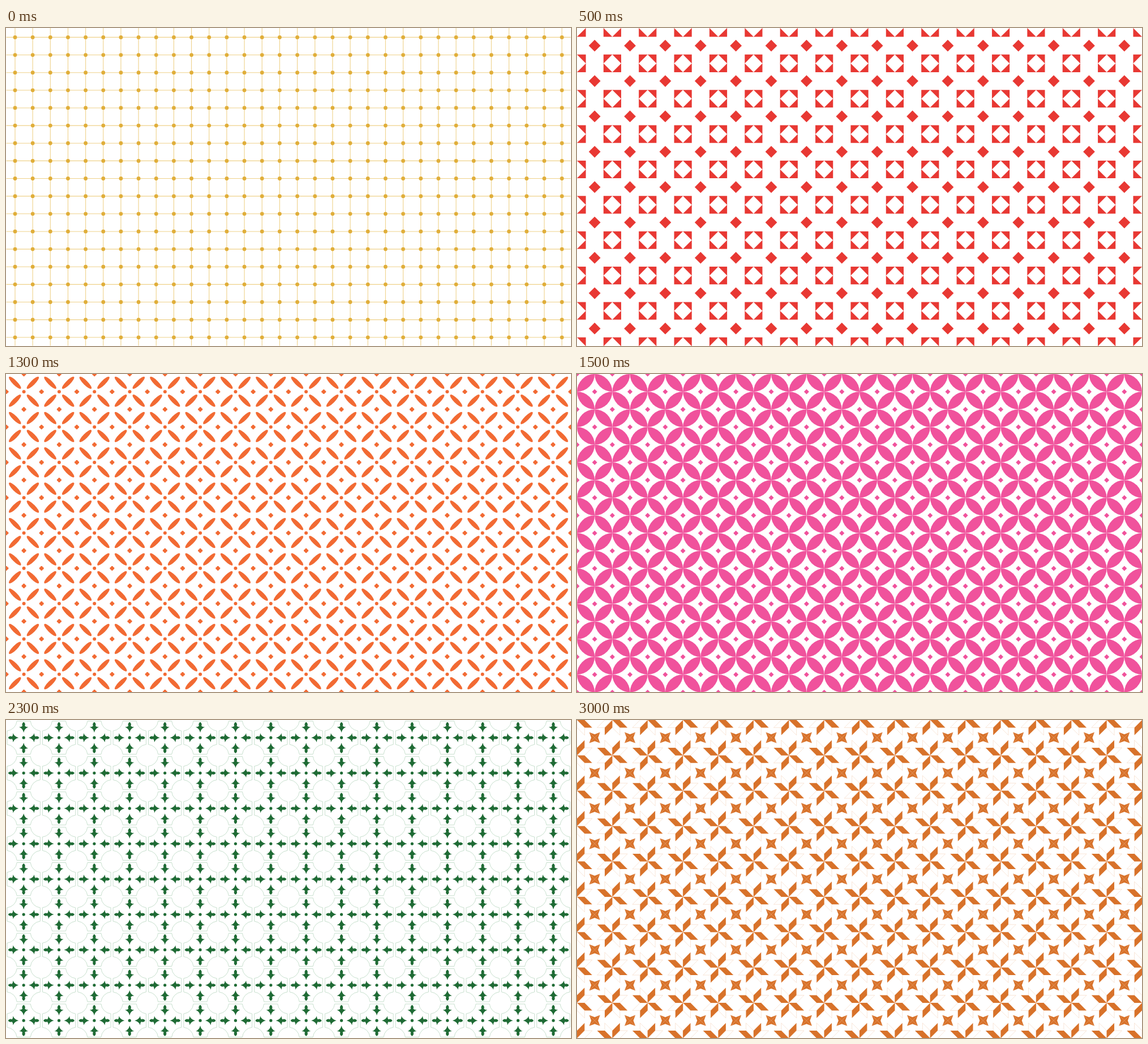
These frames come from a looping animation (998x561 px, 3.5 s). An HTML page with a canvas:

```html
<!DOCTYPE html>
<html lang="en">
<head>
<meta charset="utf-8">
<title>Pattern tiles</title>
<style>
  html, body { margin: 0; width: 100%; height: 100%; overflow: hidden; background: #fff; }
  canvas { display: block; }
</style>
</head>
<body>
<canvas id="stage" width="998" height="561"></canvas>
<script>
const W = 998, H = 561, HOLD = 500;
const TILE = W / 16, HALF = TILE / 2, Q = TILE / 4;
const ctx = document.getElementById('stage').getContext('2d');

function dot(x, y, r) {
  ctx.beginPath();
  ctx.arc(x, y, r, 0, Math.PI * 2);
  ctx.fill();
}

// Ellipse lying on a diagonal: dir 1 is "\", dir -1 is "/".
function leaf(x, y, a, b, dir) {
  ctx.beginPath();
  ctx.ellipse(x, y, a, b, dir * Math.PI / 4, 0, Math.PI * 2);
  ctx.fill();
}

function poly(...pts) {
  ctx.beginPath();
  pts.forEach(([x, y]) => ctx.lineTo(x, y));
  ctx.closePath();
}

function diamond(x, y, r) {
  poly([x, y - r], [x + r, y], [x, y + r], [x - r, y]);
  ctx.fill();
}

function at(x, y, draw) {
  ctx.save();
  ctx.translate(x, y);
  draw();
  ctx.restore();
}

function quarters(draw) {
  ctx.save();
  for (let k = 0; k < 4; k++) {
    draw(k);
    ctx.rotate(Math.PI / 2);
  }
  ctx.restore();
}

// Repeats a motif, with its origin on each tile centre.
function tiles(draw, x0 = 0, y0 = 0, step = TILE) {
  for (let j = -1; j < 10; j++)
    for (let i = -1; i < 17; i++)
      at(x0 + step * (i + .5), y0 + step * (j + .5), draw);
}

function lattice() {
  const xs = Array.from({ length: 32 }, (_, i) => 16 + i * 31.16);
  const ys = Array.from({ length: 18 }, (_, j) => 16.4 + j * 31.14);
  ctx.strokeStyle = '#efd28a';
  ctx.lineWidth = 1.1;
  ctx.beginPath();
  xs.forEach(x => { ctx.moveTo(x, 0); ctx.lineTo(x, H - .5); });
  ys.forEach(y => { ctx.moveTo(.6, y); ctx.lineTo(W - .6, y); });
  ctx.stroke();
  xs.forEach(x => ys.forEach(y => dot(x, y, 3.4)));
}

function squares() {
  diamond(0, 0, 10.4);
  at(HALF, HALF, () => quarters(() => {
    poly([-Q, -Q], [0, -Q], [-Q, 0]);
    ctx.fill();
  }));
}

function clover(x, y) {
  for (const s of [-2, 2]) {
    dot(x + s, y, 2.1);
    dot(x, y + s, 2.1);
  }
}

function petals() {
  dot(0, 0, 3);
  quarters(() => leaf(15.8, 15.8, 14.7, 4, 1));
  clover(31.15, 0);
  clover(0, 31.15);
}

function rings() {
  diamond(0, 0, 4.5);
  diamond(HALF, HALF, 4.5);
  quarters(() => {
    ctx.beginPath();
    ctx.arc(0, 0, HALF, -Math.PI / 2, 0);
    ctx.arc(HALF, -HALF, HALF, Math.PI / 2, Math.PI);
    ctx.fill();
  });
}

function florets() {
  const edge = 29.2, r = 19.3, side = 11.9;
  ctx.strokeStyle = '#a3ccae';
  ctx.lineWidth = .6;
  dot(0, 0, 2.6);
  quarters(() => {
    ctx.beginPath();
    ctx.moveTo(-side, -edge);
    ctx.lineTo(side, -edge);
    const a = Math.asin((HALF - edge) / r);
    ctx.arc(HALF, -HALF, r, Math.PI - a, Math.PI / 2 + a, true);
    ctx.stroke();

    ctx.beginPath();
    ctx.moveTo(0, -9);
    ctx.quadraticCurveTo(1.8, -16.6, 8, -18.7);
    ctx.quadraticCurveTo(4, -18.8, 2, -20.6);
    ctx.bezierCurveTo(3.4, -23, 2.6, -26, 0, -27.4);
    ctx.bezierCurveTo(-2.6, -26, -3.4, -23, -2, -20.6);
    ctx.quadraticCurveTo(-4, -18.8, -8, -18.7);
    ctx.quadraticCurveTo(-1.8, -16.6, 0, -9);
    ctx.fill();
  });
}

function dashes() {
  dot(0, 0, 5.2);
  dot(HALF, HALF, 5.2);
  quarters(k => leaf(Q, Q, 12.2, 1.9, -1));
}

function pinwheels() {
  const p = 13.4;
  ctx.strokeStyle = '#f3cdb0';
  ctx.lineWidth = .5;
  quarters(() => {
    poly([0, 0], [-9.6, -9.6], [0, -6], [9.6, -9.6]);
    ctx.fill();
  });
  at(HALF, HALF, () => quarters(() => {
    poly([0, 0], [0, -p], [-p, -2 * p], [-p, -p]);
    ctx.stroke();
    poly([0, 0], [0, -p], [p, -2 * p], [p, -p]);
    ctx.fill();
  }));
}

const scenes = [
  ['#e0ae3a', lattice],
  ['#e83833', () => tiles(squares)],
  ['#f26a33', () => tiles(petals, .45, .1, 62.31)],
  ['#f0529c', () => tiles(rings)],
  ['#1f6b35', () => tiles(florets)],
  ['#0078c1', () => tiles(dashes)],
  ['#d8722a', () => tiles(pinwheels)]
];

let shown = -1;
const start = performance.now();

function frame(now) {
  const n = Math.floor(Math.max(0, now - start) / HOLD) % scenes.length;
  if (n !== shown) {
    const [color, draw] = scenes[shown = n];
    ctx.fillStyle = '#fff';
    ctx.fillRect(0, 0, W, H);
    ctx.fillStyle = color;
    draw();
  }
  requestAnimationFrame(frame);
}
frame(start);
</script>
</body>
</html>
```
